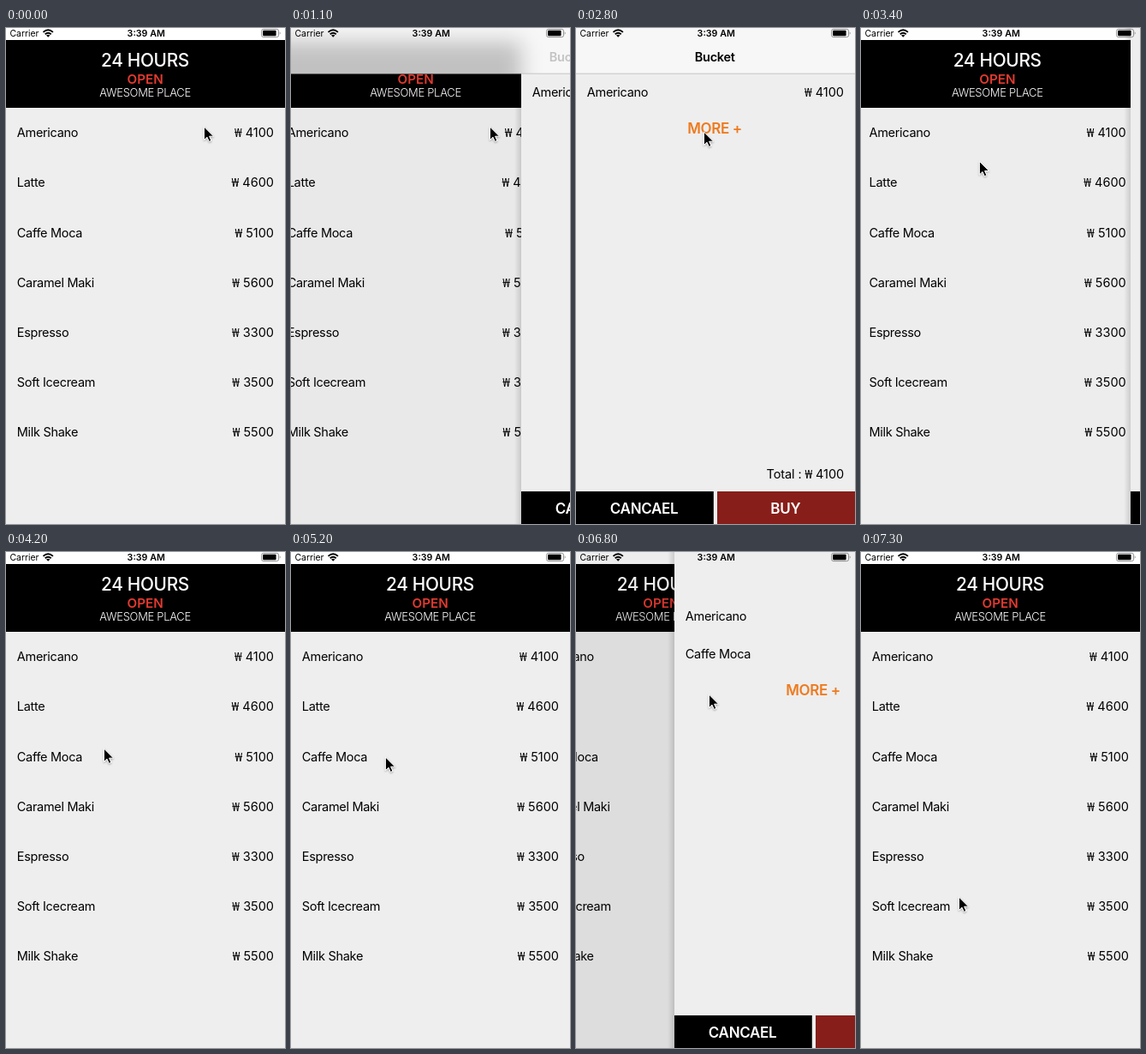
These frames come from a looping animation (326 px wide and 578 px high, 8 s). An HTML page:

```html
<!DOCTYPE html>
<html lang="en">
<head>
<meta charset="utf-8">
<title>Cafe order</title>
<style>
  html, body { margin: 0; width: 100%; height: 100%; overflow: hidden; background: #eee; }
  svg { display: block; width: 326px; height: 578px; }
  text { font: 14.5px Inter, Roboto, sans-serif; letter-spacing: -.3px; white-space: pre; }
  .mid { text-anchor: middle; }
  .price { text-anchor: end; letter-spacing: 0; }
  .won { font-family: "Noto Sans Mono", "DejaVu Sans Mono", monospace; }
  .hours { font-size: 20.8px; font-weight: 500; fill: #fff; }
  .open { font-size: 15.2px; font-weight: 600; fill: #e33a30; letter-spacing: 0; }
  .place { font-size: 13px; font-weight: 300; fill: #fff; }
  .title { font-weight: 600; }
  .more { font-size: 17px; font-weight: 600; fill: #ee7a1e; letter-spacing: -.4px; }
  .button { font-size: 17px; font-weight: 600; fill: #fff; }
  .status { font-size: 10.4px; letter-spacing: 0; }
  .clock { font-size: 10.7px; font-weight: 600; letter-spacing: 0; }
</style>
</head>
<body>
<svg viewBox="0 0 326 578">
  <defs>
    <linearGradient id="fade">
      <stop offset="0" stop-opacity="0"/>
      <stop offset="1" stop-opacity=".14"/>
    </linearGradient>
    <filter id="blur" x="-50%" y="-100%" width="200%" height="300%"><feGaussianBlur stdDeviation="12"/></filter>
    <filter id="soft" x="-50%" y="-50%" width="200%" height="200%">
      <feDropShadow dx="0" dy="1" stdDeviation=".8" flood-opacity=".35"/>
    </filter>
    <clipPath id="barClip"><path d="M0 0H326V53H0Z"/></clipPath>
  </defs>

  <g id="menu">
    <path fill="#eee" d="M0 0H326V578H0Z"/>
    <path fill="#fff" d="M0 0H326V14H0Z"/>
    <path d="M0 14H326V93H0Z"/>
    <text class="hours mid" x="162.5" y="44.5">24 HOURS</text>
    <text class="open mid" x="162.7" y="64.5">OPEN</text>
    <text class="place mid" x="162.6" y="80.3">AWESOME PLACE</text>
    <g id="rows"></g>
  </g>
  <path id="dim" d="M0 0H326V578H0Z"/>

  <g id="bucket">
    <path id="edge" fill="url(#fade)" d="M-8 0H0V578H-8Z"/>
    <path fill="#eee" d="M0 0H326V578H0Z"/>
    <g id="items"></g>
    <text id="more" class="more mid" x="162">MORE +</text>
    <path d="M0 540H160.8V578H0Z"/>
    <path fill="#881e1a" d="M165 540H326V578H165Z"/>
    <text class="button mid" x="79.6" y="566">CANCAEL</text>
    <text class="button mid" x="244.8" y="566">BUY</text>
  </g>

  <g id="bar">
    <path fill="#f7f7f7" d="M0 0H326V53H0Z"/>
    <g clip-path="url(#barClip)">
      <rect id="shade" x="-40" y="16" height="60" fill-opacity=".22" filter="url(#blur)"/>
    </g>
    <path fill="#b7b7b7" d="M0 52.7H326V53.5H0Z"/>
    <text id="title" class="title mid" y="39">Bucket</text>
  </g>

  <text class="status" x="4.5" y="9.8">Carrier</text>
  <g fill="none" stroke="#000" stroke-width="1.9">
    <path d="M43.5 4.9Q49.2 -.4 54.9 4.9M45.7 7.3Q49.2 4.1 52.7 7.3"/>
    <path fill="#000" stroke="none" d="M47 8.5Q49.2 6.9 51.4 8.5L49.2 10.8Z"/>
  </g>
  <text class="clock mid" x="163.7" y="9.8">3:39 AM</text>
  <rect x="298.6" y="1.4" width="20" height="9.2" rx="2.2" fill="none" stroke="#777" stroke-width=".8"/>
  <rect x="300.1" y="2.7" width="15.5" height="6.6" rx="1"/>
  <path fill="#777" d="M319.8 4.3Q321.6 6 319.8 7.7Z"/>

  <path id="cursor" filter="url(#soft)" stroke="#fff" stroke-width="1"
    d="M.4 0V15.6L4 12.2 6.3 17.4 8.9 16.3 6.6 11.2H11.6Z"/>
</svg>
<script>
const $ = id => document.getElementById(id);
const LOOP = 8000, STEP = 100, WIDTH = 326, SLIDE = 540;

const menu = [["Americano", 4100], ["Latte", 4600], ["Caffe Moca", 5100], ["Caramel Maki", 5600],
  ["Espresso", 3300], ["Soft Icecream", 3500], ["Milk Shake", 5500]];

// [start, direction]: 1 brings the bucket in, 0 takes it away
const slides = [[1055, 1], [3080, 0], [5425, 1], [6720, 0]];

// [time, x, y] of the pointer tip
const path = [[0, 231, 115], [100, 231, 115], [200, 232, 115], [1500, 232, 115], [1800, 154, 124],
  [1900, 154, 124], [2100, 150, 122], [2300, 150, 122], [2700, 149, 121], [3200, 149, 121],
  [3800, 116, 224], [3900, 116, 224], [4200, 114, 229], [4800, 114, 229], [5200, 110, 239],
  [5900, 110, 239], [6300, 152, 171], [6400, 152, 171], [6700, 155, 166], [6800, 155, 166],
  [7300, 114, 402], [LOOP, 114, 402]];

const won = n => `<tspan class="won">₩</tspan> ${n}`;
const row = ([name, cost], y) =>
  `<text x="12.8" y="${y}">${name}</text><text class="price" x="313" y="${y}">${won(cost)}</text>`;

const bezier = (a, b, s) => 3 * (1 - s) ** 2 * s * a + 3 * (1 - s) * s * s * b + s ** 3;

// cubic-bezier(.36, .66, .04, 1), solved by bisection
function ease(x) {
  if (x <= 0 || x >= 1) return x <= 0 ? 0 : 1;
  let lo = 0, hi = 1;
  for (let i = 0; i < 24; i++) {
    const s = (lo + hi) / 2;
    if (bezier(.36, .04, s) < x) lo = s; else hi = s;
  }
  return bezier(.66, 1, lo);
}

function pointer(t) {
  const i = path.findIndex(k => k[0] > t);
  const [t0, x0, y0] = path[i - 1], [t1, x1, y1] = path[i];
  const u = (t - t0) / (t1 - t0);
  return [x0 + (x1 - x0) * u, y0 + (y1 - y0) * u];
}

function fillBucket(count) {
  const items = [menu[0], menu[2]].slice(0, count);
  const total = items.reduce((sum, item) => sum + item[1], 0);
  $("items").innerHTML = items.map((item, i) => row(item, 80.2 + 44 * i)).join("") +
    `<text class="price" x="313" y="525.2" style="letter-spacing:-.1px">Total : ${won(total)}</text>`;
  $("more").setAttribute("y", 79 + 44 * count);
}

function move(id, x, y = 0) {
  $(id).setAttribute("transform", `translate(${x} ${y})`);
}

function show(id, visible) {
  $(id).style.display = visible ? "" : "none";
}

let filled = 0;
function draw(t) {
  const count = t < 5000 ? 1 : 2;
  if (count !== filled) fillBucket(filled = count);

  const [start, entering] = slides.filter(s => s[0] <= t).pop() || [-SLIDE, 0];
  const p = ease((t - start) / SLIDE);
  const shown = entering ? p : 1 - p;
  const offset = Math.round(WIDTH * (1 - shown));

  move("menu", -.3 * (WIDTH - offset));
  $("dim").setAttribute("fill-opacity", .11 * shown);
  move("bucket", offset);
  show("bucket", shown > 0);
  $("edge").setAttribute("fill-opacity", Math.min(1, 3 * (1 - shown)));

  show("bar", entering);
  show("shade", offset > 0);
  $("shade").setAttribute("width", 40 + offset);
  $("title").setAttribute("x", 162.2 + Math.min(163, .0285 * offset ** 2));
  $("title").setAttribute("fill-opacity", Math.min(1, 1.2 * shown));
  move("cursor", ...pointer(t));
}

$("rows").innerHTML = menu.map((item, i) => row(item, 127.2 + 58.17 * i)).join("");

const begin = performance.now();
function tick() {
  const t = Math.max(0, performance.now() - begin) % LOOP;
  draw(Math.floor(t / STEP) * STEP);
  requestAnimationFrame(tick);
}
tick();
</script>
</body>
</html>
```
